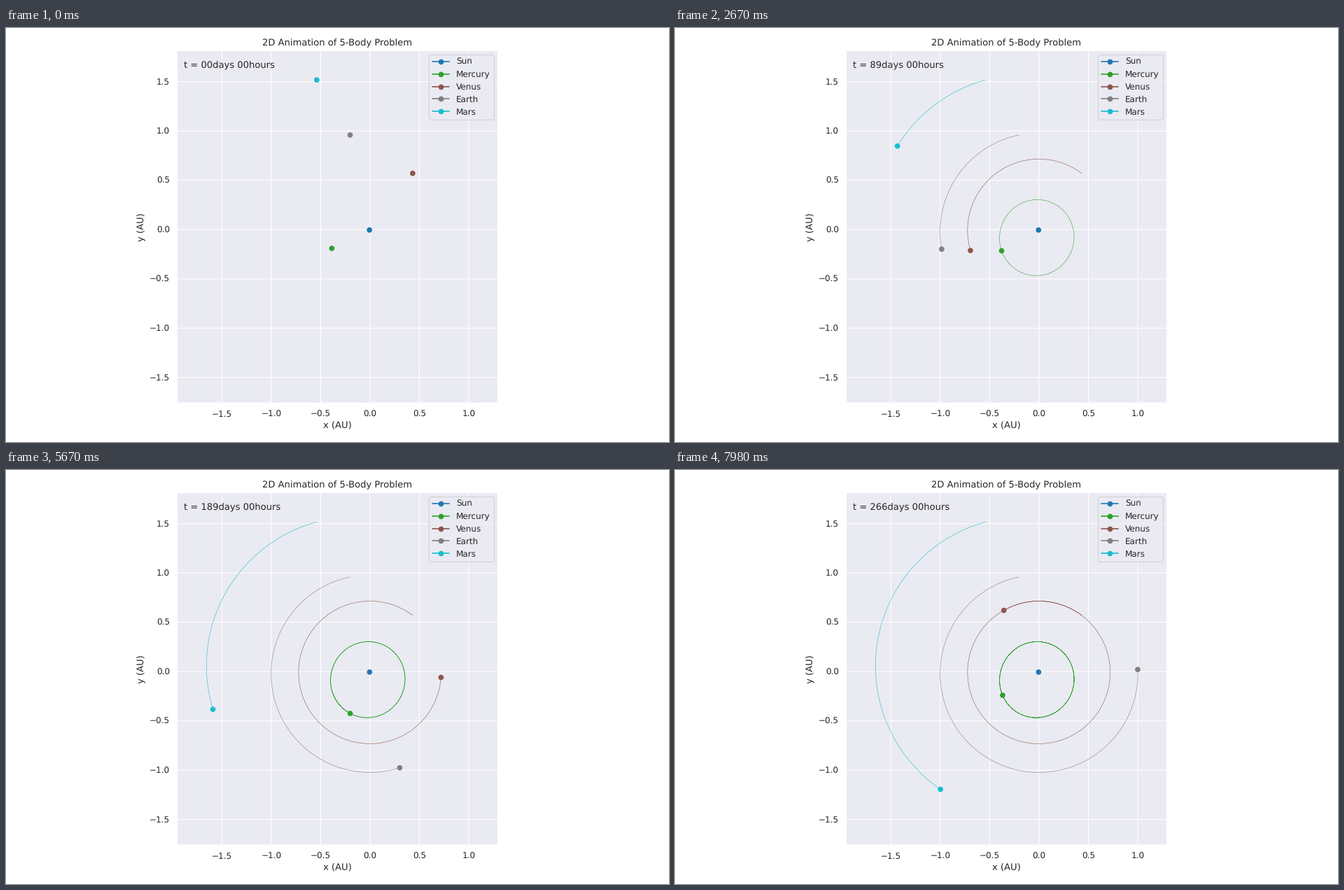
These frames come from a looping animation (947 px wide and 592 px high, 8000 ms). A matplotlib script:

```python
import numpy as np
import matplotlib.pyplot as plt
from matplotlib.animation import FuncAnimation
from matplotlib.patches import Circle
from matplotlib.ticker import MultipleLocator

W, H, DPI = 947, 592, 64
K = W / 12 / DPI          # type and line sizes are set for a 12 inch wide page
STEP, DAY_MS, LOOP_MS = 20, 30, 8000
DAYS = np.arange(LOOP_MS // DAY_MS + 1)

# Plot box, data scale and dot size in pixels
LEFT, RIGHT, TOP, BOTTOM = 244.4, 702.6, 32.3, 536
X0, Y0, AU = 519.9, 288.2, 141
DOT = 3.84

# name: colour, a, e, inclination, node, perihelion, mean longitude on day 0
PLANETS = {
    "Mercury": ("#2ca02c", 0.38710, 0.20564, 7.005, 48.36, 77.50, 185.53),
    "Venus": ("#8c564b", 0.72333, 0.00676, 3.395, 76.61, 131.60, 53.44),
    "Earth": ("#7f7f7f", 1.00075, 0.01743, 0, 0, 103.55, 101.56),
    "Mars": ("#17becf", 1.52371, 0.09340, 1.848, 49.49, 336.17, 101.18),
}

plt.rcParams.update({
    "font.family": "DejaVu Sans",
    "font.size": 12 * K,
    "text.color": ".15",
    "text.hinting": "none",
    "axes.facecolor": "#EAEAF2",
    "axes.edgecolor": "white",
    "axes.labelcolor": ".15",
    "axes.linewidth": 1.25 * K,
    "axes.titlesize": 12 * K,
    "axes.titlepad": 6 * K,
    "axes.labelsize": 12 * K,
    "axes.labelpad": 4 * K,
    "axes.grid": True,
    "axes.axisbelow": True,
    "grid.color": "white",
    "grid.linewidth": K,
    "lines.linewidth": 1.5 * K,
    "lines.markersize": 6 * K,
    "lines.markeredgewidth": K,
    "lines.solid_capstyle": "round",
    "patch.linewidth": K,
    "legend.fontsize": 11 * K,
    "legend.labelspacing": 0.51,
})
for axis in ("xtick", "ytick"):
    plt.rcParams.update({
        f"{axis}.color": ".15",
        f"{axis}.labelsize": 11 * K,
        f"{axis}.major.size": 6 * K,
        f"{axis}.major.pad": 3.5 * K,
    })


def sun_path(t):
    return np.array([-0.0053 + 6.3e-6 * t, -0.0046 - 3.4e-6 * t])


def orbit(t, a, e, inc, node, peri, lon):
    """Position in the ecliptic plane, relative to the Sun, after t days."""
    inc, node, peri, lon = np.radians([inc, node, peri, lon])
    mean = lon - peri + np.radians(0.9856077) * t / a ** 1.5
    ecc = mean + e * np.sin(mean)
    for _ in range(6):
        ecc -= (ecc - e * np.sin(ecc) - mean) / (1 - e * np.cos(ecc))
    px = a * (np.cos(ecc) - e)
    py = a * np.sqrt(1 - e * e) * np.sin(ecc)
    r, u = np.hypot(px, py), np.arctan2(py, px) + peri - node
    along, across = r * np.cos(u), r * np.sin(u) * np.cos(inc)
    return np.array([along * np.cos(node) - across * np.sin(node),
                     along * np.sin(node) + across * np.cos(node)])


fig = plt.figure(figsize=(W / DPI, H / DPI), dpi=DPI, facecolor="white")
ax = fig.add_axes([LEFT / W, 1 - BOTTOM / H, (RIGHT - LEFT) / W, (BOTTOM - TOP) / H])
ax.set_title("2D Animation of 5-Body Problem")
ax.set_xlabel("x (AU)")
ax.set_ylabel("y (AU)")
ax.xaxis.set_major_locator(MultipleLocator(0.5))
ax.yaxis.set_major_locator(MultipleLocator(0.5))
ax.tick_params(bottom=False, left=False)

sun = sun_path(DAYS)
paths = [("Sun", "#1f77b4", sun)]
paths += [(name, color, sun + orbit(DAYS, *elements))
          for name, (color, *elements) in PLANETS.items()]

bodies = []
for name, color, path in paths:
    trail, = ax.plot([], [], color=color, lw=0.5 * K)
    ax.plot([], [], "o-", color=color, label=name)  # legend key
    dot = ax.add_patch(Circle(path[:, 0], DOT / AU, fc=color, lw=0, zorder=3))
    bodies.append((path, trail, dot))

ax.set_xlim((LEFT - X0) / AU, (RIGHT - X0) / AU)
ax.set_ylim((Y0 - BOTTOM) / AU, (Y0 - TOP) / AU)
ax.legend(loc="upper right", facecolor="#EAEAF2", edgecolor=".8", framealpha=0.8)
clock = ax.text(0.02, 0.95, "", transform=ax.transAxes)

# Keep the box and grid at fractional pixel positions
for part in [ax.patch, *ax.spines.values(), *ax.get_xgridlines(), *ax.get_ygridlines()]:
    part.set_snap(False)


def draw(i):
    day = (i * STEP + STEP // 2) // DAY_MS
    for path, trail, dot in bodies:
        trail.set_data(path[:, :day + 1])
        dot.center = path[:, day]
    clock.set_text(f"t = {day:02d}days 00hours")
    return [clock]


anim = FuncAnimation(fig, draw, frames=LOOP_MS // STEP, interval=STEP,
                     repeat=True, repeat_delay=0)
plt.show()
```
